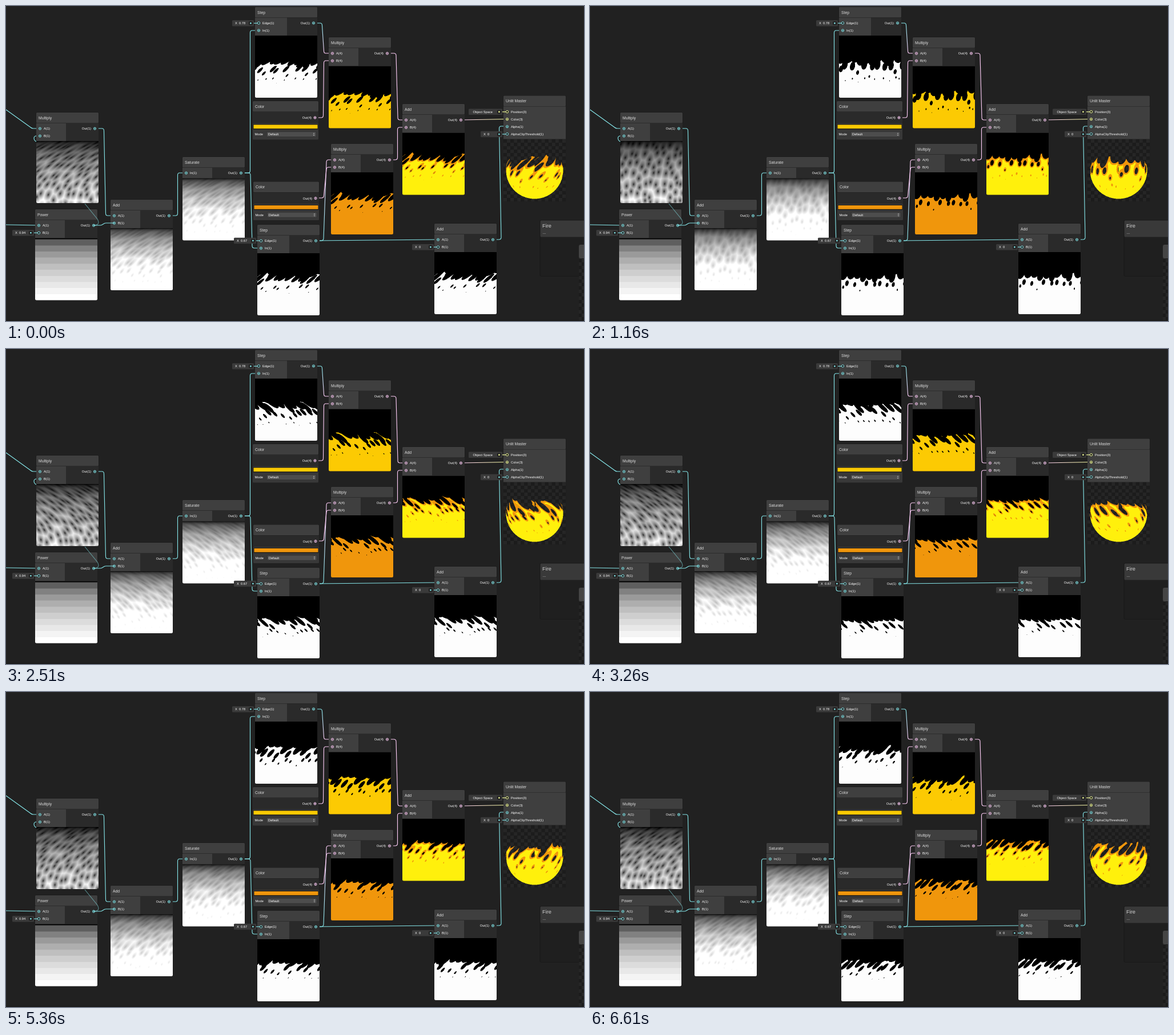
An HTML page with a canvas for the animation above (6.71 s loop, 1012x553 px).

```html
<!DOCTYPE html>
<html lang="en">
<head>
<meta charset="utf-8">
<title>Fire shader graph</title>
<style>
html, body { margin: 0; width: 100%; height: 100%; overflow: hidden; background: #212121; }
canvas, svg { position: absolute; left: 0; top: 0; width: 1012px; height: 553px; }
text { font-family: "Liberation Sans", Arial, sans-serif; font-size: 5.75px; fill: #fff; }
.title { font-size: 6.8px; fill: #dcdcdc; }
.end { text-anchor: end; }
.wire { fill: none; stroke-width: 1.15; }
</style>
</head>
<body>
<canvas id="stage" width="1012" height="553"></canvas>
<svg id="graph" viewBox="0 0 1012 553">
  <defs>
    <linearGradient id="stepMix" gradientUnits="userSpaceOnUse" x1="0" y1="30" x2="0" y2="83">
      <stop offset="0" stop-color="#84e4e7"/><stop offset="1" stop-color="#fbcbf4"/>
    </linearGradient>
    <linearGradient id="lowMix" gradientUnits="userSpaceOnUse" x1="0" y1="412" x2="0" y2="270">
      <stop offset="0" stop-color="#84e4e7"/><stop offset="1" stop-color="#fbcbf4"/>
    </linearGradient>
    <linearGradient id="outMix" gradientUnits="userSpaceOnUse" x1="797" y1="0" x2="878" y2="0">
      <stop offset="0" stop-color="#fbcbf4"/><stop offset="1" stop-color="#f6ff9a"/>
    </linearGradient>
    <pattern id="checks" width="12" height="12" patternUnits="userSpaceOnUse">
      <path d="M0 0h12v12H0z" fill="#1c1c1c"/><path d="M0 0h6v6H0zM6 6h6v6H6z" fill="#262626"/>
    </pattern>
  </defs>
</svg>
<script>
const TEAL = '#84e4e7', PINK = '#fbcbf4', LIME = '#f6ff9a';
const svg = document.getElementById('graph');
const parts = [];

const rect = (x, y, w, h, fill, more = '') =>
  parts.push(`<rect x="${x}" y="${y}" width="${w}" height="${h}" fill="${fill}" ${more}/>`);
const label = (x, y, str, cls = '') => parts.push(`<text x="${x}" y="${y}" class="${cls}">${str}</text>`);
const wire = (d, color = TEAL) => parts.push(`<path class="wire" d="${d}" stroke="${color}"/>`);

function port(x, y, color, linked = true) {
  parts.push(`<circle cx="${x}" cy="${y}" r="2.1" fill="#1c1c1c" stroke="${color}"/>`);
  if (linked) parts.push(`<circle cx="${x}" cy="${y}" r="1" fill="${color}"/>`);
}

function header(x, y, w, title) {
  rect(x - .5, y - .5, w + 1, 20, '#1b1b1b', 'rx="2"');
  rect(x, y, w, 18.5, '#3f3f3f', 'rx="1.5"');
  label(x + 4, y + 11.8, title, 'title');
}

// ins: [name, color, linked]
function node(x, y, title, ins, out, split = 52) {
  const h = 5 + ins.length * 13;
  header(x, y, 109, title);
  rect(x, y + 19, 109, h, '#2a2a2a');
  rect(x, y + 19, out ? split : 109, h, '#3f3f3f');
  ins.forEach(([name, color, linked], i) => {
    const py = y + 28.2 + i * 13;
    port(x + 6.5, py, color, linked);
    label(x + 13, py + 2, name);
  });
  if (out) {
    label(x + 96, y + 30.2, out[0], 'end');
    port(x + 102.5, y + 28.2, out[1]);
  }
}

function colorNode(x, y, fill) {
  header(x, y, 115, 'Color');
  rect(x, y + 19, 115, 19, '#2a2a2a');
  label(x + 103, y + 31, 'Out(4)', 'end');
  port(x + 109, y + 29, PINK);
  rect(x, y + 38.5, 115, 29, '#383838', 'rx="1.5"');
  rect(x + .7, y + 40.5, 113.6, 9, '#161616');
  rect(x + 1.5, y + 41.5, 112, 6.7, fill);
  label(x + 3.5, y + 60.3, 'Mode');
  rect(x + 24.5, y + 53.7, 86.5, 9, '#4d4d4d', 'rx="1.5" stroke="#2b2b2b" stroke-width=".6"');
  label(x + 27, y + 60.3, 'Default');
  parts.push(`<path d="M${x + 105.5} ${y + 57.5}l1.5-2 1.5 2zm0 1.5l1.5 2 1.5-2z" fill="#aaa"/>`);
}

function field(x, y, w, str, color, to) {
  wire(`M${x + w - 6} ${y + 5.2}H${to}`, color);
  rect(x, y, w, 10.4, '#3a3a3a', 'rx="1.5"');
  rect(x + w - 9, y + 2.2, 7, 6, '#202020', 'rx="1"');
  rect(x + w - 6.8, y + 4, 2.4, 2.4, color);
  label(x + (w > 45 ? 7.5 : 5), y + 7.3, str);
}

// Wires
wire('M0 182L43 213Q45 215 48 215H60');
wire('M60 228H54Q49 228 49 232Q49 236 53 238');
wire('M0 384L57 385');
wire('M155 215H168Q171.5 215 171.5 219L174.5 364Q174.5 368 178 368H190');
wire('M285 368H297Q300.5 368 300.5 364V297Q300.5 293 304 293H315');
wire('M412 293H424Q427.5 293 427.5 289V47Q427.5 43 431 43H442');
wire('M412 293H424Q428 293 428 297L431 421Q431 425 435 425H446');
wire('M538 30H550Q553.5 30 553.5 34L556.5 79Q556.5 83 560 83H571', 'url(#stepMix)');
wire('M541 196H552Q555.5 196 555.5 192L556.5 100Q556.5 96 560 96H571', PINK);
wire('M667 83H679Q683 83 683 87L686 196Q686 200 690 200H700', PINK);
wire('M671 270H681Q685.5 270 685.5 266V217Q685.5 213 689 213H700', PINK);
wire('M542 412H551Q556 412 556 408L561 274Q561 270 565 270H575', 'url(#lowMix)');
wire('M542 337H552Q556.5 337 556.5 333L561 287Q561 283 565 283H575', PINK);
wire('M542 412L757 410');
wire('M852 410H863Q867 410 867 406L863.5 215Q863.5 211 867 211H878');
wire('M797 200L878 198.5', 'url(#outMix)');

// Nodes
const one = (name, linked = true) => [name, TEAL, linked];
const four = name => [name, PINK, true];
const OUT1 = ['Out(1)', TEAL], OUT4 = ['Out(4)', PINK];
node(53, 187, 'Multiply', [one('A(1)'), one('B(1)')], OUT1);
node(51, 357, 'Power', [one('A(1)'), one('B(1)', false)], OUT1);
node(183, 340, 'Add', [one('A(1)'), one('B(1)')], OUT1);
node(309, 265, 'Saturate', [one('In(1)')], OUT1);
node(436, 1.7, 'Step', [one('Edge(1)', false), one('In(1)')], OUT1, 56);
node(440, 384, 'Step', [one('Edge(1)', false), one('In(1)')], OUT1, 56);
node(565, 55, 'Multiply', [four('A(4)'), four('B(4)')], OUT4);
node(569, 242, 'Multiply', [four('A(4)'), four('B(4)')], OUT4);
node(694, 172, 'Add', [four('A(4)'), four('B(4)')], OUT4);
node(750, 382, 'Add', [one('A(1)'), one('B(1)', false)], OUT1);
node(871, 157.5, 'Unlit Master', [['Position(3)', LIME, false], ['Color(3)', LIME, true],
  one('Alpha(1)'), one('AlphaClipThreshold(1)', false)]);
colorNode(432, 167, '#fcca03');
colorNode(433, 308.5, '#f0960c');
wire('M153 385H165C170 385 170 381 175 381H190');
parts.push(`<path class="wire" d="M138 347L160 374Q166 385 153 385" stroke="${TEAL}" opacity=".55"/>`);

field(396, 25, 38, 'X&#160; 0.78', TEAL, 440);
field(11, 393, 38, 'X&#160; 0.94', TEAL, 55);
field(399, 406.8, 39, 'X&#160; 0.67', TEAL, 444);
field(711, 418, 38, 'X&#160; 0', TEAL, 754);
field(831, 219.8, 38, 'X&#160; 0', TEAL, 875);
field(810, 180.6, 59, 'Object Space', LIME, 875);

// Side panels
rect(935, 376, 80, 98.5, '#1f1f1f', 'stroke="#191919" rx="2"');
rect(935.5, 376.5, 80, 29, '#393939', 'rx="2"');
parts.push('<text x="939" y="389" style="font-size:9.3px;fill:#d0d0d0">Fire</text>');
label(939.5, 400, '...', 'title');
rect(1003, 430, 12, 125, 'url(#checks)');
rect(1003, 419, 14, 24, '#454545', 'rx="3"');
rect(0, 551.5, 1012, 2, '#191919');
svg.insertAdjacentHTML('beforeend', parts.join(''));

// Flame field
const SIZE = 109, RES = 218, COLS = 10, ROWS = 6.5, RISE = .3, LEAN = .95;
const ctx = document.getElementById('stage').getContext('2d');
const fract = n => n - Math.floor(n);
const points = new Map();

function point(i, j) {
  const key = i * 1000 + j;
  let p = points.get(key);
  if (!p) {
    const a = fract(Math.sin(i * 15.27 + j * 99.41) * 46839.32);
    const b = fract(Math.sin(i * 47.63 + j * 89.98) * 46839.32);
    p = [Math.sin(b * 2) * .5 + .5, Math.cos(a * 2) * .5 + .5];
    points.set(key, p);
  }
  return p;
}

function voronoi(x, y) {
  const ci = Math.floor(x), cj = Math.floor(y);
  let best = 9;
  for (let j = cj - 1; j <= cj + 1; j++) for (let i = ci - 1; i <= ci + 1; i++) {
    const p = point(i, j), dx = i + p[0] - x, dy = j + p[1] - y;
    best = Math.min(best, dx * dx + dy * dy);
  }
  return Math.sqrt(best);
}

const noise = (u, f, s) => {
  const y = 1 - f, lean = LEAN * Math.cos(s + .25);
  return 1.35 * voronoi((u - lean * y * y) * COLS, (y - RISE * s) * ROWS);
};
const bands = f => Math.max(0, Math.min(10, Math.ceil((f - .02) * 10.2))) / 10;
const gray = n => {
  n = Math.max(0, Math.min(1, n));
  const c = 255 * (n < .0031 ? n * 12.92 : 1.055 * n ** (1 / 2.4) - .055);
  return [c, c, c];
};

const BLACK = [0, 0, 0], WHITE = [253, 253, 253], GOLD = [252, 202, 3],
  ORANGE = [240, 150, 12], YELLOW = [255, 240, 12];
const flame = n => n > .78 ? YELLOW : n > .67 ? ORANGE : null;

// Each preview: colour from ramp g and noise v, then the places it is shown
const previews = [
  [(g, v) => gray(g * v), [[53, 237]]],
  [(g, v) => gray(g + g * v), [[183, 390], [309, 302.5]]],
  [(g, v) => g + g * v > .78 ? WHITE : BLACK, [[436, 52]]],
  [(g, v) => g + g * v > .67 ? WHITE : BLACK, [[440, 434], [750, 432]]],
  [(g, v) => g + g * v > .78 ? GOLD : BLACK, [[565, 105.5]]],
  [(g, v) => g + g * v > .67 ? ORANGE : BLACK, [[569, 292]]],
  [(g, v) => flame(g + g * v) || BLACK, [[694, 222.5]]],
  [g => gray(bands(g) ** .94), [[51, 407.5]]]
];

const buffer = document.createElement('canvas');
buffer.width = buffer.height = RES;
const bctx = buffer.getContext('2d');
const image = bctx.createImageData(RES, RES);

function paint(shade) {
  const d = image.data;
  for (let y = 0, k = 0; y < RES; y++) for (let x = 0; x < RES; x++, k += 4) {
    const c = shade(x, y);
    d[k + 3] = c ? 255 : 0;
    if (c) { d[k] = c[0]; d[k + 1] = c[1]; d[k + 2] = c[2]; }
  }
  bctx.putImageData(image, 0, 0);
}

function show(x, y) {
  ctx.save();
  ctx.beginPath();
  ctx.roundRect(x, y, SIZE, SIZE, [0, 0, 2.5, 2.5]);
  ctx.clip();
  ctx.drawImage(buffer, x, y, SIZE, SIZE);
  ctx.restore();
}

function checker(x, y) {
  for (let j = 0; j < 18; j++) for (let i = 0; i < 18; i++) {
    ctx.fillStyle = (i + j) % 2 ? '#262626' : '#1c1c1c';
    ctx.fillRect(x + i * 6.055, y + j * 6.055, 6.1, 6.1);
  }
}

const values = new Float32Array(RES * RES);
function draw(s) {
  ctx.clearRect(0, 0, 1012, 553);
  for (let y = 0, k = 0; y < RES; y++) for (let x = 0; x < RES; x++)
    values[k++] = noise((x + .5) / RES, (y + .5) / RES, s);
  for (const [shade, places] of previews) {
    paint((x, y) => shade((y + .5) / RES, values[y * RES + x]));
    places.forEach(p => show(...p));
  }
  // The same field wrapped on a ball, seam facing front
  paint((x, y) => {
    const nx = (x + .5 - RES / 2) / 100, ny = (y + .5 - RES / 2) / 100, r = nx * nx + ny * ny;
    if (r > 1) return null;
    const u = fract(Math.atan2(nx, Math.sqrt(1 - r)) / Math.PI);
    const f = .5 + Math.asin(ny) / Math.PI;
    return flame(f + f * noise(u, f, s));
  });
  checker(871, 234);
  show(871, 234);
}

// Held poses: 150 ms apart, with uneven ends
function held(t) {
  if (t < 80) return 0;
  if (t < 260) return 80;
  if (t >= 6610) return 6610;
  if (t >= 6290) return 6290;
  return Math.min(6110, 110 + 150 * Math.floor((t - 110) / 150));
}

const start = performance.now();
let last = -1;
function tick() {
  const t = held((performance.now() - start) % 6710);
  if (t !== last) draw((last = t) / 1000);
  requestAnimationFrame(tick);
}
tick();
</script>
</body>
</html>
```
